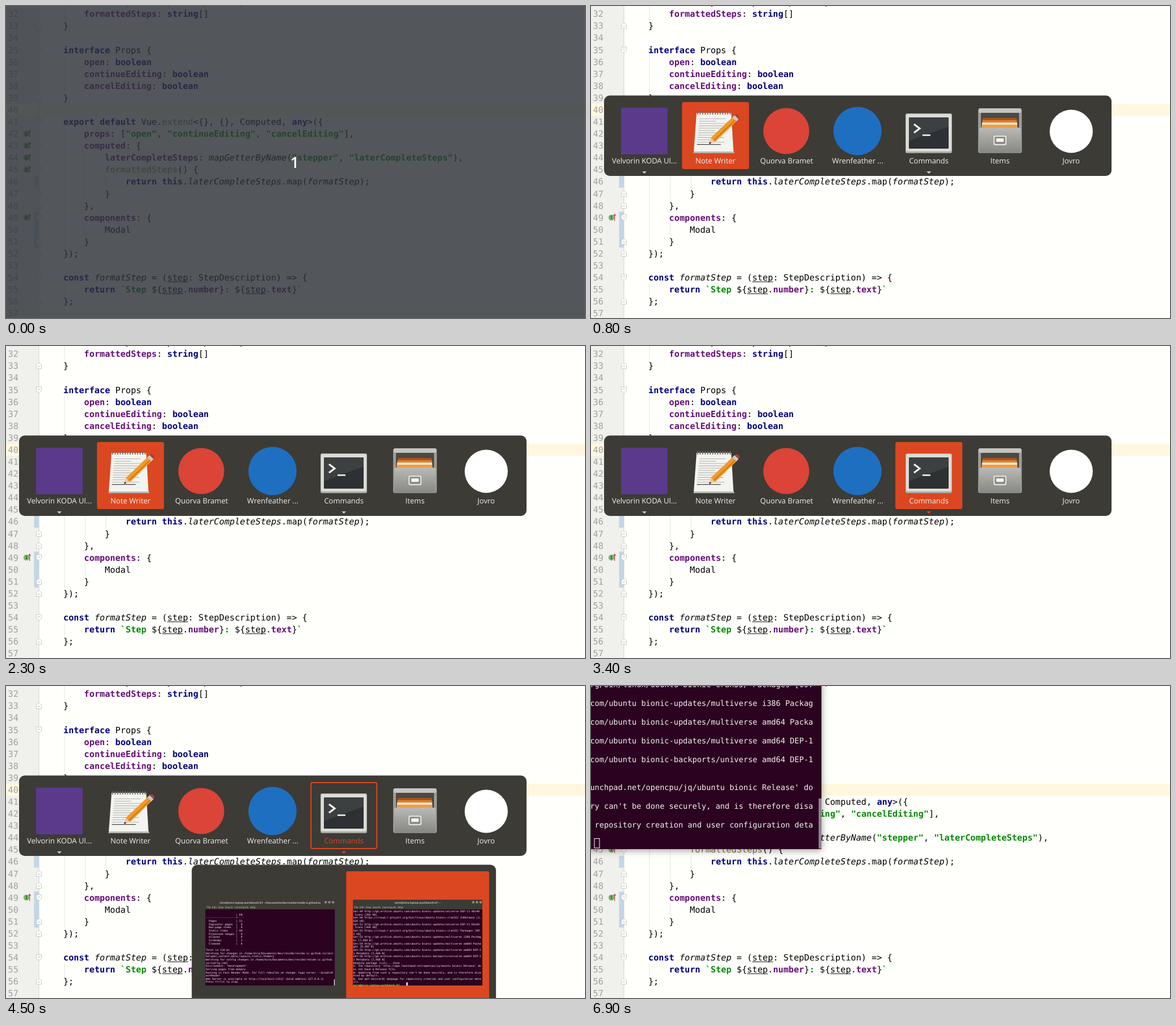
An HTML page with a canvas that plays this animation: 1020 by 549 pixels, repeating every 7.7 s.

```html
<!DOCTYPE html>
<html lang="en">
<head>
<meta charset="utf-8">
<title>Window switcher</title>
<style>
  html, body { margin: 0; width: 100%; height: 100%; overflow: hidden; background: #fffffb; }
  canvas { display: block; }
</style>
</head>
<body>
<canvas id="stage" width="1020" height="549"></canvas>
<script>
const ctx = document.getElementById('stage').getContext('2d');
const LOOP = 7700;
const MONO = '"DejaVu Sans Mono", monospace';
const SANS = '"Open Sans", "Noto Sans", sans-serif';
const ORANGE = '#db4720', PANEL = '#3c3b36', AUBERGINE = '#2b0220';

// Value of the last [time, value] pair that has been reached.
const at = (t, keys) => keys.reduce((v, [time, next]) => t >= time ? next : v, keys[0][1]);

function box(color, x, y, w, h, radius = 0) {
  ctx.fillStyle = color;
  ctx.beginPath();
  ctx.roundRect(x, y, w, h, radius);
  ctx.fill();
}

function poly(color, ...points) {
  ctx.fillStyle = color;
  ctx.beginPath();
  points.forEach(([x, y]) => ctx.lineTo(x, y));
  ctx.closePath();
  ctx.fill();
}

function line(color, width, ...points) {
  ctx.strokeStyle = color;
  ctx.lineWidth = width;
  ctx.beginPath();
  points.forEach(([x, y], i) => i ? ctx.lineTo(x, y) : ctx.moveTo(x, y));
  ctx.stroke();
}

function disc(color, x, y, r) {
  ctx.fillStyle = color;
  ctx.beginPath();
  ctx.arc(x, y, r, 0, 7);
  ctx.fill();
}

function text(str, x, y, font, color, align = 'left') {
  ctx.font = font;
  ctx.fillStyle = color;
  ctx.textAlign = align;
  ctx.fillText(str, x, y);
}

/* ---------- source code ---------- */

const ROW = 21.08, COL = 9.151, CODE_SIZE = 15.2, FIRST = 31;
const STYLES = {
  k: ['bold', '#000080'], p: ['bold', '#660e7a'], s: ['bold', '#078a07'],
  m: ['', '#7a7a43'], i: ['italic', '#000'], u: ['', '#000'], n: ['', '#000']
};

// Styled runs are written as ~<style><text>~.
const CODE = [
  '        ~platerCompleteSteps~: StepDescription[]',
  '        ~pformattedSteps~: ~kstring~[]',
  '    }',
  '',
  '    ~kinterface~ Props {',
  '        ~popen~: ~kboolean~',
  '        ~pcontinueEditing~: ~kboolean~',
  '        ~pcancelEditing~: ~kboolean~',
  '    }',
  '',
  '    ~kexport default~ Vue.~mextend~<{}, {}, Computed, ~kany~>({',
  '        ~pprops~: [~s"open"~, ~s"continueEditing"~, ~s"cancelEditing"~],',
  '        ~pcomputed~: {',
  '            ~platerCompleteSteps~: ~imapGetterByName~(~s"stepper"~, ~s"laterCompleteSteps"~),',
  '            ~mformattedSteps~() {',
  '                ~kreturn this~.~ilaterCompleteSteps~.map(~iformatStep~);',
  '            }',
  '        },',
  '        ~pcomponents~: {',
  '            Modal',
  '        }',
  '    });',
  '',
  '    ~kconst~ ~iformatStep~ = (~ustep~: StepDescription) => {',
  '        ~kreturn~ ~s`Step ~${~ustep~.~pnumber~}~s: ~${~ustep~.~ptext~}~s`~',
  '    };',
  ''
];
const GUIDES = [[103, 31, 32], [103, 36, 38], [103, 42, 51], [103, 55, 55],
                [139.5, 44, 47], [139.5, 50, 50], [176, 46, 46]];
const CHANGED = [[46, 46], [49, 51]];
const FOLD_OPEN = [35, 41, 43, 45, 49, 54], FOLD_END = [33, 39, 47, 48, 51, 52, 56];
const MARKED = [42, 43, 44, 45, 49];

const rowTop = n => 172 + (n - 40) * ROW;
const rowMid = n => rowTop(n) + ROW / 2;

function codeLine(source, baseline) {
  let col = 0;
  source.split('~').forEach((part, i) => {
    const style = i % 2 ? part[0] : 'n';
    const run = i % 2 ? part.slice(1) : part;
    const [face, color] = STYLES[style];
    const x = 64.4 + col * COL;
    text(run, x, baseline, `${face} ${CODE_SIZE}px ${MONO}`, color);
    if (style === 'u') box(color, x, baseline + 1.6, run.length * COL, 1);
    col += run.length;
  });
}

function foldMark(y, dir) {
  const shape = [[53.5, y - 5 * dir], [62.5, y - 5 * dir], [62.5, y + 1.5 * dir],
                 [58, y + 5.5 * dir], [53.5, y + 1.5 * dir]];
  poly('#fff', ...shape);
  line('#c9c9c6', 1, ...shape, shape[0]);
  line('#b5b5b2', 1, [56, y - dir], [60, y - dir]);
}

function overrideMark(y) {
  disc('#7dbb6c', 36, y, 5.3);
  text('I', 36, y + 3, `bold 8px ${MONO}`, '#2f5a28', 'center');
  line('#b8434f', 1.2, [41.6, y + 6], [41.6, y - 5.5]);
  line('#b8434f', 1.2, [39.4, y - 3], [41.6, y - 6], [43.8, y - 3]);
}

function drawCode() {
  box('#fffffb', 0, 0, 1020, 549);
  box('#f0f0ed', 0, 0, 58, 549);
  box('#fff8df', 0, rowTop(40), 1020, ROW);
  box('#d2d2cf', 57.5, 0, 1, 549);
  for (const [from, to] of CHANGED)
    box('#c3d5e6', 49.5, rowTop(from), 8.5, (to - from + 1) * ROW);
  for (const [x, from, to] of GUIDES)
    box('#e4e4e1', x - .5, rowTop(from), 1, (to - from + 1) * ROW);
  CODE.forEach((source, i) => {
    const baseline = rowMid(FIRST + i) + 5.4;
    text(FIRST + i, 3.6, baseline, `${CODE_SIZE}px ${MONO}`, '#a0a09e');
    codeLine(source, baseline);
  });
  FOLD_OPEN.forEach(n => foldMark(rowMid(n), 1));
  FOLD_END.forEach(n => foldMark(rowMid(n), -1));
  MARKED.forEach(n => overrideMark(rowMid(n)));
}

/* ---------- shell windows ---------- */

const HOST = 'mira@mira-laptop-workbench-07';
const SHELL_COL = 8.187, SHELL_ROW = 16.45;
const ARCHIVE = 'http://gb.archive.ubuntu.com/ubuntu bionic-';
const CRAN = 'https://cloud.r-project.org/bin/linux/ubuntu bionic-cran35/ ';
const HOME = '/home/mira/Documents/dev/reside/reside-ic.github.';

const UPDATE_LOG = [
  `Get:49 ${ARCHIVE}updates/universe DEP-11 48x48`, ' Icons [202 kB]',
  `Get:50 ${CRAN}InRelease [3,`, '626 kB]',
  `Get:51 ${ARCHIVE}updates/universe DEP-11 64x64`, ' Icons [444 kB]',
  `Get:52 ${CRAN}Packages [69.`, '5 kB]',
  `Get:53 ${ARCHIVE}updates/multiverse i386 Packag`, 'es [7,484 B]',
  `Get:54 ${ARCHIVE}updates/multiverse amd64 Packa`, 'ges [9,284 B]',
  `Get:55 ${ARCHIVE}updates/multiverse amd64 DEP-1`, '1 Metadata [2,468 B]',
  `Get:56 ${ARCHIVE}backports/universe amd64 DEP-1`, '1 Metadata [7,980 B]',
  'Reading package lists... Done',
  "E: The repository 'http://ppa.launchpad.net/opencpu/jq/ubuntu bionic Release' do",
  'es not have a Release file.',
  "N: Updating from such a repository can't be done securely, and is therefore disa",
  'bled by default.',
  'N: See apt-secure(8) manpage for repository creation and user configuration deta',
  'ils.'
];
const SITE_COUNTS = { 'Pages': 31, 'Paginator pages': 0, 'Non-page items': 0, 'Static items': 40,
                      'Processed images': 0, 'Aliases': 0, 'Sitemaps': 1, 'Cleaned': 0 };
const SERVER_LOG = [
  '',
  ' '.repeat(19) + '| EN',
  '-'.repeat(19) + '+----',
  ...Object.entries(SITE_COUNTS).map(([k, v]) => `  ${k.padEnd(17)}| ${String(v).padStart(2)}`),
  '',
  'Total in 118 ms',
  `Watching for changes in ${HOME}io/{arc`,
  'hetypes,content,data,layouts,static,themes}',
  `Watching for config changes in ${HOME}`,
  'io/config.toml',
  'Environment: "development"',
  'Serving pages from memory',
  'Running in Fast Render Mode. For full rebuilds on change: hugo server --disableF',
  'astRender',
  'Web Server is available at http://localhost:1313/ (bind address 127.0.0.1)',
  'Press Ctrl+C to stop'
];

// Rows of shell text; the origin is the first baseline.
function shellText(rows, x, y, scale) {
  ctx.save();
  ctx.translate(x, y);
  ctx.scale(scale, scale);
  rows.forEach((row, i) => text(row, 0, i * SHELL_ROW, `13.6px ${MONO}`, '#f4f1f3'));
  if (rows === UPDATE_LOG)
    text(HOST, 0, 23 * SHELL_ROW, `bold 13.6px ${MONO}`, '#8ae234');
  ctx.restore();
}

function drawShell(t) {
  const focused = t < 6600;
  ctx.save();
  ctx.shadowColor = focused ? 'rgba(0,0,0,.5)' : 'rgba(0,0,0,.4)';
  ctx.shadowBlur = focused ? 20 : 12;
  ctx.shadowOffsetY = focused ? 4 : 2;
  box(AUBERGINE, -300, -150, 706, 437);
  ctx.restore();
  shellText(UPDATE_LOG, -1.5 - 32 * SHELL_COL, 282.1 - 23 * SHELL_ROW, 1);
  box(t < 6900 ? '#bd5f45' : '#8d818b', 401, 198, 5, 88);
  if (!focused) {
    ctx.strokeStyle = '#fff';
    ctx.lineWidth = 1;
    ctx.strokeRect(6, 268.5, 9, 16.5);
  } else if (t < 6200) {
    box('#fff', 6, 268.5, 9, 16.5);
  }
}

function shellThumb(x, title, rows) {
  box(PANEL, x, 376, 228, 17, [2, 2, 0, 0]);
  box(AUBERGINE, x, 393, 228, 134);
  text(title, x + 114, 382.5, `bold 4.6px ${SANS}`, '#c9c5bd', 'center');
  text('File  Edit  View  Search  Commands  Help', x + 2, 390.6, `4.6px ${SANS}`, '#d5d1c9');
  [212, 218.5, 225].forEach(dx => disc('#8b877f', x + dx, 380.5, 2.3));
  shellText(rows, x + .5, 398, .344);
  if (rows === UPDATE_LOG) box('#fff', x + 94, 521.5, 2.4, 5.5);
  else box('#d8d4d6', x + 226.5, 516, 1.5, 11);
}

function codeThumb(x) {
  box('#2f2e2b', x, 387, 230, 7);
  box('#f7f7f3', x, 394, 230, 122);
  box('#e4e4e0', x, 394, 44, 122);
  for (let i = 0; i < 22; i++)
    box('#8c8ca6', x + 52 + i % 4 * 5, 400 + i * 5, 40 + i * 37 % 90, 1.2);
}

/* ---------- switcher ---------- */

function notepadIcon() {
  poly('#b9b9b4', [183, 253], [250, 253], [253, 259], [180, 259]);
  poly('#f3f3ef', [186, 188], [247, 188], [251, 256], [181, 256]);
  for (let i = 0; i < 14; i++) line('#6d6d68', 1.8, [188 + i * 4.4, 185], [188 + i * 4.4, 191]);
  for (let i = 0; i < 12; i++)
    box(i > 10 ? '#444' : '#b4b4b0', 191 - i * .4, 198 + i * 4.1, [46, 30, 48, 42][i % 4], 1.1);
  poly('#eec89a', [208, 243], [211, 232], [219, 239]);
  poly('#f09a28', [211, 232], [251, 194], [258, 201], [219, 239]);
  line('#c46d12', 1.5, [216, 237], [256, 199]);
  poly('#c8c8c8', [249, 196], [253, 192], [260, 199], [256, 203]);
  poly('#a5423c', [253, 192], [257, 190], [262, 194], [260, 199]);
  poly('#222', [208, 243], [209, 239], [212, 241]);
}

function promptIcon() {
  box('#a9a9a4', 554, 189, 82, 70, 3);
  box('#dcdcd7', 555, 190, 80, 66, 3);
  box('#2d3133', 560, 196, 70, 55, 1);
  poly('rgba(255,255,255,.07)', [560, 196], [630, 196], [630, 212], [560, 238]);
  line('#f4f4f4', 3.2, [569, 208], [579, 215.5], [569, 223]);
  box('#f4f4f4', 584, 226, 14, 2.6);
}

function cabinetIcon() {
  box('#9b9b98', 682, 180, 77, 79, 4);
  box('#c4c4c1', 683, 180, 75, 8, 3);
  box('#4b4945', 687, 188, 67, 30);
  for (let i = 0; i < 4; i++)
    box(['#a8521e', '#e0812d', '#f2e3c8', '#ee9d43'][i], 690 - i * .6, 197 + i * 4, 60 + i, 12, 1);
  const front = ctx.createLinearGradient(0, 214, 0, 259);
  front.addColorStop(0, '#b9b9b6');
  front.addColorStop(1, '#868683');
  box(front, 684, 214, 73, 45, 3);
  box('#e3e3e0', 709, 228, 23, 17, 3);
  box('#8f8f8c', 711, 230, 19, 13, 2);
  box('#f4f4f2', 714, 233, 13, 6, 1);
}

const APPS = [
  ['Velvorin KODA Ul...', () => box('#5b3a8c', 53, 179, 82, 82)],
  ['Note Writer', notepadIcon],
  ['Quorva Bramet', () => disc('#db4437', 344, 220, 40.5)],
  ['Wrenfeather ...', () => disc('#1f6fc0', 469.5, 220, 42.5)],
  ['Commands', promptIcon],
  ['Items', cabinetIcon],
  ['Jovro', () => disc('#fff', 846, 220.5, 38)]
];
const WITH_WINDOWS = [0, 4];
const appX = i => 94 + i * 125.3;

function drawSwitcher(selected, outlined) {
  box(PANEL, 23, 157.5, 894, 141.5, 10);
  APPS.forEach(([label, icon], i) => {
    const x = appX(i), active = i === selected;
    if (active && outlined) {
      ctx.strokeStyle = ORANGE;
      ctx.lineWidth = 2;
      ctx.beginPath();
      ctx.roundRect(x - 58, 170, 116, 116, 3);
      ctx.stroke();
    } else if (active) {
      box(ORANGE, x - 59, 169, 118, 118, 3);
    }
    icon();
    text(label, x, 277, `13px ${SANS}`, active && outlined ? ORANGE : '#f0f0ee', 'center');
    if (WITH_WINDOWS.includes(i))
      poly(active ? ORANGE : '#cfcfca', [x - 4, 291], [x + 4, 291], [x, 295]);
  });
}

// Preview panel centred below an application.
function drawPreviews(app, alpha, picked) {
  if (!alpha) return;
  const x = appX(app) - 268;
  ctx.save();
  ctx.globalAlpha = alpha;
  box(PANEL, x, 314.5, 536, 260, 10);
  if (picked >= 0) box(ORANGE, x + 12 + picked * 260, 326, 252, 240, 3);
  if (app) {
    shellThumb(x + 24, `${HOST}: ~/Documents/dev/reside/reside-ic.github.io`, SERVER_LOG);
    shellThumb(x + 284, `${HOST}: ~`, UPDATE_LOG);
  } else {
    codeThumb(x + 24);
    codeThumb(x + 282);
  }
  ctx.restore();
}

/* ---------- timeline ---------- */

function draw(t) {
  ctx.textRendering = 'geometricPrecision';
  drawCode();
  if (t < 400) {
    box('rgba(46,50,57,.82)', 0, 0, 1020, 549);
    text('1', 508.5, 284.5, `600 27px ${SANS}`, '#fff', 'center');
  }
  if (t >= 5300) drawShell(t);
  if (t >= 800 && t < 5500) {
    const selected = at(t, [[0, 1], [1400, 0], [2200, 1], [2700, 2], [3100, 3], [3400, 4]]);
    drawSwitcher(selected, t >= 3900);
    drawPreviews(0, at(t, [[0, 0], [2000, .02], [2100, .85], [2200, .4], [2300, 0]]), -1);
    drawPreviews(4, at(t, [[0, 0], [3800, .5], [3900, .95], [4200, 1]]),
                 at(t, [[0, -1], [3900, 0], [4500, 1]]));
  }
}

const start = performance.now();
function frame() {
  draw((performance.now() - start) % LOOP);
  requestAnimationFrame(frame);
}
frame();
</script>
</body>
</html>
```
